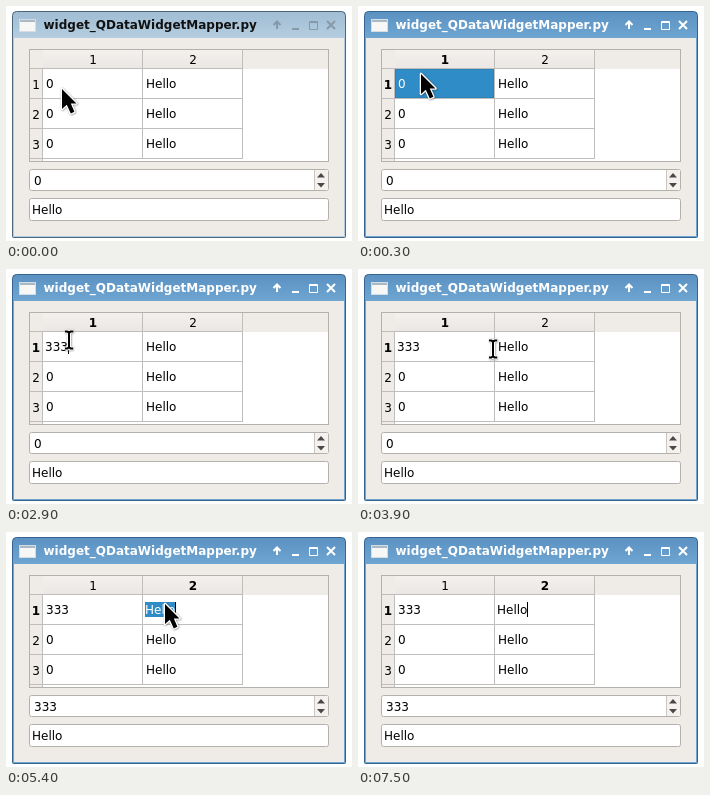
These frames come from a looping animation (346x235 px, 8 s). An HTML page with a canvas:

```html
<!DOCTYPE html>
<html lang="en">
<head>
<meta charset="utf-8">
<title>Widget mapper</title>
<style>
html, body { margin: 0; width: 346px; height: 235px; overflow: hidden; background: #fff; }
canvas { display: block; }
</style>
</head>
<body>
<canvas width="346" height="235"></canvas>
<script>
const g = document.querySelector('canvas').getContext('2d');
const LOOP = 8000;
const BLUE = '#308cc6', GRID = '#c0bebc', FACE = '#efebe7', EDGE = '#b4b0ac';

// Pointer track: start time, x, y, shape
const POINTER = [
  [0, 56, 82, 'arrow'], [100, 59, 76, 'arrow'], [200, 63, 67, 'arrow'],
  [2300, 63, 70, 'beam'], [3600, 65, 69, 'beam'], [3700, 71, 67, 'beam'], [3900, 135, 79, 'beam'],
  [4000, 147, 75, 'arrow'], [4100, 156, 72, 'arrow'], [4200, 159, 71, 'arrow'],
  [5500, 159, 71, 'beam'], [7400, 227, 94, 'beam'], [7500, 0, 0, 'none']
];

function box(x, y, w, h, color) {
  g.fillStyle = color;
  g.fillRect(x, y, w, h);
}

function text(s, x, y, { color = '#000', bold = false, align = 'left' } = {}) {
  g.font = `${bold ? 'bold ' : ''}12px "DejaVu Sans", sans-serif`;
  g.fillStyle = color;
  g.textAlign = align;
  g.fillText(s, x, y);
}

function gradient(y0, y1, top, bottom) {
  const fill = g.createLinearGradient(0, y0, 0, y1);
  fill.addColorStop(0, top);
  fill.addColorStop(1, bottom);
  return fill;
}

function rounded(x, y, w, h, r, fill, stroke) {
  g.beginPath();
  g.roundRect(x + .5, y + .5, w - 1, h - 1, r);
  g.fillStyle = fill;
  g.fill();
  g.strokeStyle = stroke;
  g.lineWidth = 1;
  g.stroke();
}

function line(path, color, width) {
  g.strokeStyle = color;
  g.lineWidth = width;
  g.stroke(new Path2D(path));
}

function drawWindow(active) {
  const ink = active ? '#fff' : '#111';
  const mark = active ? '#fff' : '#8799a7';
  rounded(6, 5, 334, 227, [4, 4, 1, 1],
    active ? gradient(6, 32, '#5c92c2', '#6fa5d1') : gradient(6, 32, '#a0bdd4', '#b5cde0'),
    active ? '#34648f' : '#4d6578');
  box(8, 32, 330, 198, FACE);

  box(13, 13, 17, 13, '#d5dde3');
  box(14, 14, 15, 2, '#a9bac6');
  box(14, 16, 15, 9, '#f7f7f5');

  text('widget_QDataWidgetMapper.py', 37.5, 23, { color: ink, bold: true });
  line('M271 23V16M267.5 19L271 15.5L274.5 19', mark, 2);
  box(286, 22, 7, 2, mark);
  line('M303.5 15.5H311.5V23.5H303.5ZM303 16.5H312', mark, 1);
  line('M321 15L329 23M329 15L321 23', mark, 2);
}

function drawTable({ col, edit, first }) {
  box(23, 43, 300, 113, EDGE);
  box(24, 44, 298, 111, '#fff');
  box(24, 44, 298, 19, FACE);
  box(37, 44, 200, 18, gradient(44, 62, '#f3f0ed', '#ebe7e3'));
  box(24, 62, 13, 93, FACE);
  box(24, 62, 213, 1, GRID);
  box(36, 62, 1, 93, GRID);
  for (let i = 0; i < 2; i++) {
    box(136 + 100 * i, 44, 1, 109, GRID);
    text(i + 1, 87 + 100 * i, 58, { bold: col === i, align: 'center' });
  }
  for (let i = 0; i < 3; i++) {
    const y = 82 + 30 * i;
    box(24, y + 10, 213, 1, GRID);
    text(i + 1, 30, y + 1, { bold: i === 0 && col >= 0, align: 'center' });
    for (let c = 0; c < 2; c++) {
      const current = i === 0 && col === c;
      if (current && edit) continue;
      if (current) {
        box(37 + 100 * c, 63, 99, 29, '#2c81b7');
        box(38 + 100 * c, 64, 97, 27, BLUE);
      }
      text(c ? 'Hello' : i ? '0' : first, 40 + 100 * c, y, { color: current ? '#fff' : '#000' });
    }
  }
}

function drawEditor(x, s, marked, caret) {
  if (marked) box(x, 70, 31, 15, BLUE);
  text(s, x, 82, { color: marked ? '#fff' : '#000' });
  if (caret) box(x + Math.round(g.measureText(s).width), 70, 1, 15, '#000');
}

function drawFields(value) {
  rounded(23, 163, 300, 22, 2, '#fff', EDGE);
  box(309, 164, 13, 20, '#f4f1ee');
  box(308, 164, 1, 20, '#c9c5c1');
  g.fillStyle = '#4b4947';
  g.fill(new Path2D('M311 171.5L315 167L319 171.5ZM311 177L315 181.5L319 177Z'));
  text(value, 28, 179);
  rounded(23, 192, 300, 23, 2, '#fff', EDGE);
  text('Hello', 26, 208);
}

function drawPointer(t) {
  const [, x, y, shape] = POINTER.findLast(p => p[0] <= t);
  const glyph = {
    arrow: 'M0 1V21L4.8 16.8L8.8 25.4L12.4 23.8L8.8 15.4H14.5Z',
    beam: 'M-4 -7.5H-1.5L0 -6L1.5 -7.5H4M0 -6V8M-4 9.5H-1.5L0 8L1.5 9.5H4'
  }[shape];
  if (!glyph) return;
  g.save();
  g.translate(x, y);
  g.lineJoin = 'round';
  g.shadowColor = 'rgba(0,0,0,.45)';
  g.shadowBlur = 2;
  g.shadowOffsetX = g.shadowOffsetY = .5;
  line(glyph, '#fff', shape === 'arrow' ? 2.6 : 4);
  g.shadowColor = 'transparent';
  if (shape === 'arrow') {
    g.fillStyle = '#000';
    g.fill(new Path2D(glyph));
  } else {
    line(glyph, '#000', 2);
  }
  g.restore();
}

function draw(t) {
  const active = t >= 300;
  const clicked = t >= 4300;
  const typing = t >= 2300 && !clicked;
  const renaming = t >= 5400;
  box(0, 0, 346, 235, '#fff');
  drawWindow(active);
  drawTable({
    col: clicked ? 1 : active ? 0 : -1,
    edit: typing || renaming,
    first: clicked ? '333' : '0'
  });
  drawFields(clicked ? '333' : '0');
  if (typing) drawEditor(39, '3'.repeat(1 + (t >= 2700) + (t >= 2900)), false, t < 3600);
  if (renaming) {
    const caret = t < 5900 || (t >= 6400 && t < 7000) || t >= 7500;
    drawEditor(139, 'Hello', t < 6400, caret);
  }
  drawPointer(t);
}

function tick() {
  draw(performance.now() % LOOP);
  requestAnimationFrame(tick);
}
tick();
</script>
</body>
</html>
```
